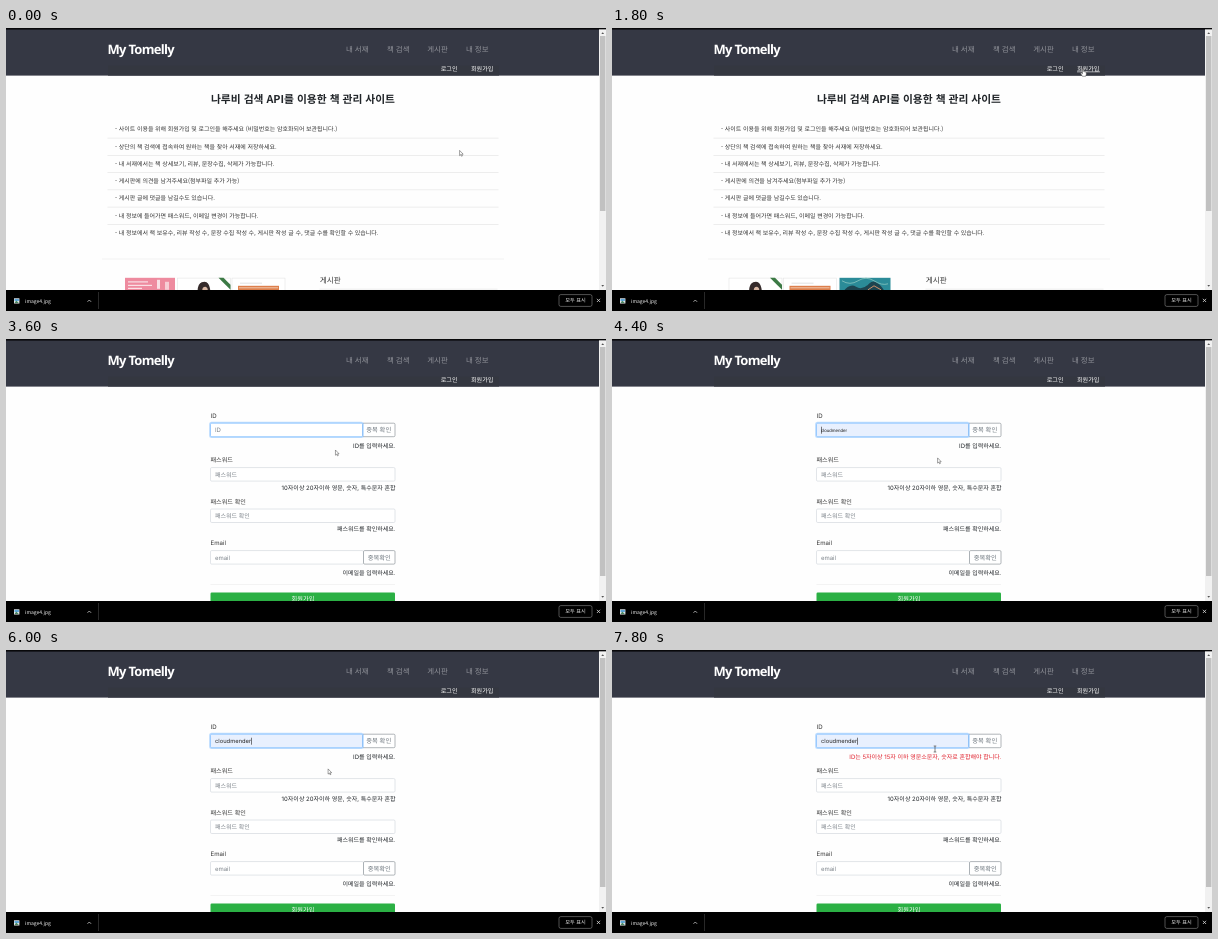
Animation of 600 by 283 pixels, one loop 8 s. Source, as an HTML page:

```html
<!DOCTYPE html>
<html lang="ko">
<head>
<meta charset="utf-8">
<style>
  html, body { margin: 0; width: 100%; height: 100%; overflow: hidden; background: #fff; }
  svg { display: block; width: 100%; height: 100%; text-rendering: geometricPrecision; }
  text { font-family: "Noto Sans CJK KR", "Noto Sans CJK", sans-serif; white-space: pre; }
  #form text { font-family: Inter, "Noto Sans CJK KR", "Noto Sans CJK", sans-serif; }
  #form text.preview { font-family: "Liberation Sans", sans-serif; }
  text.logo { font-family: "Open Sans", sans-serif; font-weight: 700; letter-spacing: -.7px; }
</style>
</head>
<body>
<svg id="stage" viewBox="0 0 600 283"></svg>
<script>
const LOOP = 8000, STEP = 200, CARD_PITCH = 54.5;
const USER = "cloudmender";
const stage = document.getElementById("stage");
const byId = id => document.getElementById(id);

const rect = (x, y, w, h, fill, extra = "") =>
  `<rect x="${x}" y="${y}" width="${w}" height="${h}" fill="${fill}" ${extra}/>`;
const path = (d, fill, extra = "") => `<path d="${d}" fill="${fill}" ${extra}/>`;
const stroke = (d, color, width = .6) =>
  path(d, "none", `stroke="${color}" stroke-width="${width}"`);
// Text placed by the vertical middle of its line.
const text = (x, mid, size, fill, value, extra = "") =>
  `<text x="${x}" y="${mid + size * .36}" font-size="${size}" fill="${fill}" ${extra}>${value}</text>`;
const END = 'text-anchor="end"', MIDDLE = 'text-anchor="middle"';

function header() {
  const nav = [[340, "내 서재"], [381, "책 검색"], [421.3, "게시판"], [460, "내 정보"]];
  return rect(0, 0, 593, 47.6, "#353844") + rect(102, 37.5, 391, 10.1, "#343740") +
    rect(0, 0, 600, 1.6, "#08080a") +
    text(101.5, 21.3, 13, "#fff", "My Tomelly", 'class="logo"') +
    nav.map(([x, label]) => text(x, 21.6, 7.4, "#92949b", label)).join("") +
    text(434.7, 40.8, 6.1, "#fff", "로그인") + text(465, 40.8, 6.1, "#fff", "회원가입") +
    `<g id="underline">${rect(465, 43.6, 23, .6, "#fff")}</g>`;
}

function covers() {
  const card = (i, art) => `<g transform="translate(${117 + i * CARD_PITCH} 249.8)">${art}</g>`;
  const frame = rect(0, .3, 53, 40, "#fff", 'stroke="#e4e4e4" stroke-width=".6"');
  const pink = rect(2, 0, 50, 30, "#ee8b9f") + rect(5, 3.5, 20, 1.2, "#fae0e5") +
    rect(5, 7, 24, 1.2, "#fae0e5") + rect(5, 10, 14, 1.2, "#fae0e5") +
    rect(34, 2, 3, 9, "#fae0e5") + rect(42, 4, 4, 8, "#f7cdd5");
  const portrait = frame + path("M20 14Q20 4 27 4Q32 4 33 14Z", "#352b2b") +
    path("M25 14Q24 9 28 9Q31 10 30 14Z", "#d9b8a4") + path("M41 0H46L53 7V12Z", "#3c7a45");
  const orange = frame + rect(6, 8, 41, 6, "#dd7f4c") +
    stroke("M7 10H46", "#f7d8c2", .8) + rect(8, 5, 22, .6, "#ccc");
  const teal = rect(1.5, 0, 51, 30, "#2b8b98") +
    path("M5 14Q12 5 18 9T31 6T47 14Z", "#1d4450") +
    stroke("M4 3Q12 8 20 3T36 3T50 6", "#75b9b7", 1) + stroke("M30 12L36 8L43 12", "#d08e68", 1);
  return `<clipPath id="window">${rect(115, 245, 166, 20, "#fff")}</clipPath>
    <g clip-path="url(#window)"><g id="cards">${[pink, portrait, orange, teal].map((art, i) => card(i, art)).join("")}</g></g>`;
}

function homePage() {
  const notes = [
    "사이트 이용을 위해 회원가입 및 로그인을 해주세요 (비밀번호는 암호화되어 보관됩니다.)",
    "상단의 책 검색에 접속하여 원하는 책을 찾아 서재에 저장하세요.",
    "내 서재에서는 책 상세보기, 리뷰, 문장수집, 삭제가 가능합니다.",
    "게시판에 의견을 남겨주세요(첨부파일 추가 가능)",
    "게시판 글에 댓글을 남길수도 있습니다.",
    "내 정보에 들어가면 패스워드, 이메일 변경이 가능합니다.",
    "내 정보에서 책 보유수, 리뷰 작성 수, 문장 수집 작성 수, 게시판 작성 글 수, 댓글 수를 확인할 수 있습니다."
  ];
  return `<g id="home">` +
    text(297, 70.9, 10.75, "#212529", "나루비 검색 API를 이용한 책 관리 사이트", MIDDLE + ' font-weight="700"') +
    notes.map((note, i) => text(109, 101.2 + i * 17.25, 5.97, "#333", "- " + note) +
      (i < 6 ? rect(101.5, 109.8 + i * 17.25, 391, .6, "#e2e2e2") : "")).join("") +
    rect(96, 230.7, 402, .6, "#e6e6e6") + covers() +
    text(313.7, 252.2, 7.6, "#333", "게시판") + rect(313.5, 260.8, 178, .6, "#e2e2e2") + `</g>`;
}

function formPage() {
  const field = (y, width, hint) =>
    rect(204.5, y, width, 13.5, "#fff", 'rx="1.2" stroke="#ced4da" stroke-width=".6"') +
    text(209, y + 7, 6, "#7b8289", hint);
  const button = (x, y, label, id = "") =>
    `<g id="${id}">${rect(x, y, 389 - x, 13.5, "#fff", 'rx="1.2" stroke="#7d858c" stroke-width=".6"')}
     ${text((x + 389) / 2, y + 7, 6.3, "#6c757d", label, MIDDLE)}</g>`;
  const label = (y, value) => text(204.5, y, 6.1, "#333", value);
  const help = (y, value, id = "") => text(389.5, y, 6, "#212529", value, `${END} id="${id}"`);
  return `<g id="form">` +
    label(77, "ID") + button(356.5, 84.2, "중복 확인", "check") +
    rect(204.5, 84.2, 152, 13.5, "#fff", 'id="idBox" rx="1.2" stroke-width=".7"') +
    rect(203.8, 83.5, 153.4, 14.9, "none", 'id="glow" rx="1.8" stroke="#80bdff" stroke-opacity=".5" stroke-width="1.4"') +
    text(209, 91.2, 6, "#7b8289", "ID", 'id="idText"') +
    rect(209, 87.7, .6, 7, "#222", 'id="caret"') +
    help(107.2, "", "idHelp") +
    label(121, "패스워드") + field(128.6, 184.5, "패스워드") +
    help(148.6, "10자이상 20자이하 영문, 숫자, 특수문자 혼합") +
    label(162.5, "패스워드 확인") + field(170, 184.5, "패스워드 확인") +
    help(190, "패스워드를 확인하세요.") +
    label(204.2, "Email") + field(211.6, 153, "email") + button(357.5, 211.6, "중복확인") +
    help(234.3, "이메일을 입력하세요.") +
    rect(204.5, 245, 184.5, .5, "#e6e6e6") +
    rect(204.5, 253.5, 184.5, 14, "#2bb044", 'rx="1.2"') +
    text(297, 259.8, 6.2, "#fff", "회원가입", MIDDLE) + `</g>`;
}

function browserChrome() {
  return rect(593, 1.6, 7, 261, "#f1f1f1") + rect(594, 8, 5.4, 175, "#c1c1c1", 'id="thumb"') +
    path("M595.3 6L596.7 4.2L598.1 6Z", "#555") + path("M595.3 257L596.7 258.8L598.1 257Z", "#555") +
    rect(0, 262, 600, 21, "#000") + rect(8, 270.3, 5.4, 5.2, "#eee") +
    rect(8.5, 270.9, 4.4, 2.2, "#5fa6d8") + path("M8.5 275L10.2 272.6L12.9 275Z", "#4c8862") +
    text(19, 272.8, 5, "#eee", "image4.jpg") +
    stroke("M81.5 273.8L83.3 272L85.1 273.8", "#ccc", .8) + rect(92, 264, .6, 17, "#444") +
    rect(553, 266.6, 33, 11.8, "none", 'rx="1.8" stroke="#888" stroke-width=".6"') +
    text(569.5, 272.2, 5.2, "#eee", "모두 표시", MIDDLE) +
    stroke("M590.9 270.8L594.1 274M594.1 270.8L590.9 274", "#ddd", .8);
}

function pointers() {
  const outline = 'stroke="#444" stroke-width=".5" stroke-linejoin="round"';
  return `<g id="pointer">
    <g id="arrow">${path("M-.4 .4V5.6L.8 4.6L1.6 6.3L2.4 5.9L1.7 4.2H3.2Z", "#fff", outline)}</g>
    <g id="hand">${path("M-.6 0Q0-.7 .6 0V2.5L3.3 3.2V5.5L2.6 7.3H-.6L-2.4 4.4L-1.8 3.8L-.6 4.8Z", "#fff", outline)}</g>
    <g id="beam">${stroke("M-1.3 -3H1.3M0 -3V3M-1.3 3H1.3", "#333", .6)}</g></g>`;
}

stage.innerHTML = rect(0, 0, 600, 283, "#fefefe") + homePage() + formPage() +
  header() + browserChrome() + pointers();

const route = [
  [0, 454, 122], [400, 454, 122], [1400, 471, 41], [2000, 471, 41], [2400, 338, 88],
  [3200, 338, 88], [3800, 327, 118.5], [4400, 326, 118.5], [5400, 322.5, 118.5],
  [6000, 322.5, 118.5], [6400, 368, 95.5], [7000, 368, 95.5], [7600, 323, 99], [LOOP, 323, 99]
];
const ease = p => p * p * (3 - 2 * p);
const progress = (t, from, to) => ease(Math.min(1, Math.max(0, (t - from) / (to - from))));

function pointerAt(t) {
  const i = route.findIndex(stop => stop[0] > t);
  const [from, x0, y0] = route[i - 1], [to, x1, y1] = route[i];
  const p = progress(t, from, to);
  return [x0 + (x1 - x0) * p, y0 + (y1 - y0) * p];
}

const show = (id, on) => byId(id).setAttribute("display", on ? "inline" : "none");
const set = (id, attrs) => {
  for (const name in attrs) byId(id).setAttribute(name, attrs[name]);
};

function drawPointer(t, onForm) {
  const [x, y] = pointerAt(t);
  const inside = (l, top, r, b) => x >= l && x <= r && y >= top && y <= b;
  const onLink = inside(465, 36, 488, 46);
  const kind = onLink || onForm && inside(357, 84, 389, 98) ? "hand"
    : onForm && inside(204, 84, 356.5, 100) ? "beam" : "arrow";
  ["arrow", "hand", "beam"].forEach(id => show(id, id === kind));
  set("pointer", { transform: `translate(${x} ${y})` });
  show("underline", onLink);
}

function drawForm(t) {
  const preview = t >= 3800 && t < 4800, filled = t >= 4800, error = t >= 6600;
  const pressed = t >= 6400 && t < 7400, focused = t >= 2400 && !pressed;
  const idText = byId("idText");
  idText.textContent = preview || filled ? USER : "ID";
  set("idText", {
    class: preview ? "preview" : "",
    "font-size": preview ? 4.5 : filled ? 5.8 : 6,
    fill: preview || filled ? "#222" : "#7b8289"
  });
  set("idBox", { fill: preview || filled ? "#e8f0fe" : "#fff", stroke: focused ? "#80bdff" : "#ced4da" });
  show("glow", focused);
  show("caret", focused && (t - (t < 7400 ? 2000 : 7400)) % 1000 < 500);
  set("caret", { x: 209 + (filled ? idText.getComputedTextLength() : 0) });
  const [box, caption] = byId("check").children;
  box.setAttribute("fill", pressed ? "#6c757d" : "#fff");
  box.setAttribute("stroke", pressed ? "#b5babe" : "#7d858c");
  box.setAttribute("stroke-width", pressed ? 1.6 : .6);
  caption.setAttribute("fill", pressed ? "#fff" : "#6c757d");
  byId("idHelp").textContent = error
    ? "ID는 5자이상 15자 이하 영문소문자, 숫자로 혼합해야 합니다." : "ID를 입력하세요.";
  set("idHelp", { fill: error ? "#e0202c" : "#212529" });
}

function draw(now) {
  const t = Math.floor((now % LOOP) / STEP) * STEP;
  const onForm = t >= 2000;
  show("home", !onForm);
  show("form", onForm);
  set("thumb", { height: onForm ? 229 : 175 });
  set("cards", { transform: `translate(${-CARD_PITCH * progress(t, 800, 1400)} 0)` });
  if (onForm) drawForm(t);
  drawPointer(t, onForm);
}

const start = performance.now();
function tick() {
  draw(performance.now() - start);
  requestAnimationFrame(tick);
}
tick();
</script>
</body>
</html>
```
